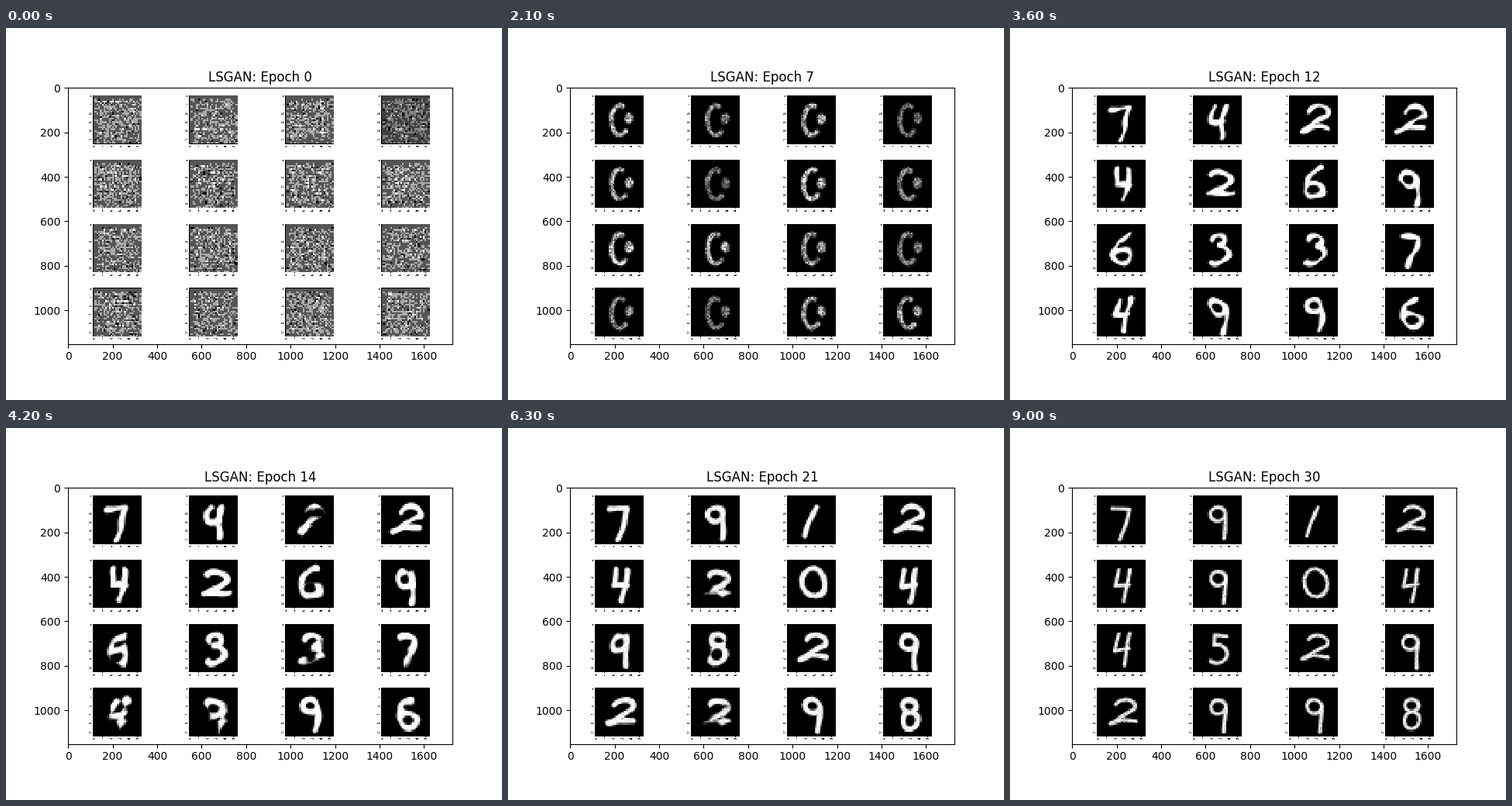
A matplotlib script for the animation above (9300 ms loop, 640 px wide and 480 px high).

```python
import numpy as np
import matplotlib.pyplot as plt
from matplotlib.animation import FuncAnimation
from matplotlib.textpath import TextPath

plt.rcParams["text.kerning_factor"] = 6

EPOCHS, STEP = 31, 300
N = 28                      # cells per side of a sample
SIDE = 62.4                 # sample side in stroke units
CELL_W, CELL_H = 432, 288   # size of one small plot
LEFT, TOP, SIZE = 112.68, 34.56, 217.44
SHIFT = 1.74                # half a screen pixel, in board units

mid = (np.arange(N) + 0.5) * SIDE / N
GX, GY = np.meshgrid(mid, mid)


def line(*xy):
    return np.array(xy, float).reshape(-1, 2)


def arc(cx, cy, rx, ry, start=0, stop=360):
    a = np.radians(np.linspace(start, stop, 14))
    return np.c_[cx + rx * np.cos(a), cy + ry * np.sin(a)]


def join(*parts):
    return np.vstack(parts)


GLYPHS = {
    "0": [arc(34, 30, 15, 18)],
    "1": [line(37, 16, 22, 52)],
    "2": [join(arc(36, 24, 13, 9, 205, 385), line(17, 45, 32, 41, 50, 43))],
    "3": [arc(33, 22, 9, 7, 200, 440), arc(31, 40, 13, 11, 285, 490)],
    "4": [line(28, 13, 23, 34, 41, 32), line(42, 13, 35, 53)],
    "5": [join(line(43, 16, 28, 15), arc(31, 39, 13, 12, 250, 490))],
    "6": [join(line(40, 12, 27, 22), arc(33, 40, 12, 9, 180, 530))],
    "7": [line(20, 17, 42, 18, 38, 34, 30, 57)],
    "8": [arc(34, 22, 9, 8), arc(34, 41, 10, 11)],
    "9": [join(arc(32, 24, 10, 9), line(42, 24, 40, 56))],
    # open ring with a blob that all samples share early on
    "e": [arc(32, 32, 11, 19, 50, 290), arc(44, 30, 2, 4)],
}

# What the 16 samples resemble at each key epoch
KEYS = [7, 12, 17, 30]
LOOKS = ["e" * 16, "7422426963374996", "7912420498292298", "7912490445292998"]
RADIUS = [2.9, 2.9, 2.9, 2.2]
GRAIN = [0.7, 0.1, 0.1, 0.25]
WOBBLE = [0.3, 2.0, 1.4, 0.5]
BLOBS = [0.2, 0.5, 0.2, 0.15]


def distance(lines, x, y):
    """Distance of every cell to the nearest stroke."""
    best = np.full((N, N), 11.0)
    for pts in lines:
        for (x0, y0), (x1, y1) in zip(pts, pts[1:]):
            dx, dy = x1 - x0, y1 - y0
            t = ((x - x0) * dx + (y - y0) * dy) / (dx * dx + dy * dy + 1e-9)
            t = np.clip(t, 0, 1)
            best = np.minimum(best, np.hypot(x - x0 - t * dx, y - y0 - t * dy))
    return best


def noise(rng, k):
    """Untrained output: two greys in faint stripes, few black or white cells."""
    p = rng.random((N, N))
    stripe = (np.arange(N) % 2)[:, None]
    p = np.clip(p + np.where(p > 0.04, 0.14 * stripe - 0.07, 0), 0, 1)
    edge = np.minimum(np.minimum(GX, SIDE - GX), np.minimum(GY, SIDE - GY))
    p = np.where((edge < 6) & (p > 0.15), p * 0.75, p)
    p[:2] = np.clip(p[:2], 0.02, 0.4)
    p[:, 0] = np.clip(p[:, 0], 0.02, 0.4)
    v = np.select([p < 0.015, p < 0.53, p < 0.955], [0, 85, 170], 255)
    return v * (0.76 if k == 3 else 1.0)


def spots(rng, k):
    """First traces of training: up to two small bright spots."""
    amps = np.random.default_rng(40 + k).random(2) ** 3
    v = np.zeros((N, N))
    for x, y, amp in ((35, 17, amps[0]), (27, 43, amps[1])):
        v += amp * np.clip(1.25 - np.hypot((GX - x) * 1.25, (GY - y) * 0.85) / 6, 0, 1)
    return 255 * np.clip(v, 0, 1) * rng.uniform(0.35, 1, (N, N))


def strokes(rng, k, epoch):
    j = int(np.clip(np.searchsorted(KEYS, epoch, side="right") - 1, 0, len(KEYS) - 2))
    w = np.clip((epoch - KEYS[j]) / (KEYS[j + 1] - KEYS[j]), 0, 1)

    def mix(a):
        return a[j] * (1 - w) + a[j + 1] * w

    own = np.random.default_rng(k)
    ph = own.uniform(0, 2 * np.pi, 4) + 0.08 * epoch
    glow = own.uniform(0.55, 1.1)
    x = GX + mix(WOBBLE) * np.sin(GY / 8 + ph[0])
    y = GY + mix(WOBBLE) * np.sin(GX / 8 + ph[1])
    d = mix([distance(GLYPHS[look[k]], x, y) for look in LOOKS[j:j + 2]]
            if j == 0 else
            [None] * j + [distance(GLYPHS[look[k]], x, y) for look in LOOKS[j:j + 2]])
    r = mix(RADIUS) * (1 + mix(BLOBS) * np.sin(GX / 5 + ph[2]) * np.sin(GY / 5 + ph[3]))
    v = np.clip((r + 3 * w * (1 - w) + 1.2 - d) / 2.2, 0, 1)
    v = v * (1.05 - mix(GRAIN) * rng.random((N, N)))
    return 255 * np.clip(v * mix([glow, 1, 1, 1]), 0, 1)


def sample(epoch, k):
    rng = np.random.default_rng(1000 * epoch + k)
    if epoch == 0:
        return noise(rng, k)
    if epoch < 4:
        v = spots(rng, k) * epoch / 3
        if epoch < 3:
            v = np.maximum(v, noise(rng, k) * 0.3 ** epoch)
    else:
        v = strokes(rng, k, epoch) * min(1, (epoch - 3) / 4)
        if epoch < 7:
            v = np.maximum(v, spots(rng, k) * (7 - epoch) / 4)
    if epoch < 5:
        v[0, ::2] = np.maximum(v[0, ::2], 45)
        v[::2, 0] = np.maximum(v[::2, 0], 35)
    return v


def stamp(img, text, x, base, align):
    """Rasterise a tick label with 4x4 oversampling."""
    path = TextPath((0, 0), text, size=10, prop={"family": "DejaVu Sans"})
    x0 = int(round(x - 6.36 * len(text) * align))
    s = (np.arange(64) + 0.5) / 4
    px, py = np.meshgrid(s, 12 - s)
    ink = path.contains_points(np.c_[px.ravel(), py.ravel()]).reshape(16, 4, 16, 4)
    ink = np.clip(1.5 * ink.mean(axis=(1, 3)), 0, 1)
    part = img[base - 12:base + 4, x0:x0 + 16]
    np.minimum(part, 255 * (1 - ink), out=part)


def blank_plot():
    img = np.full((CELL_H, CELL_W), 255.0)
    for t in range(0, 26, 5):
        off = (t + 0.5) * SIZE / N
        img[252:255, int(LEFT + off + 0.5)] = 0
        img[int(TOP + off), 110:113] = 0
        stamp(img, str(t), LEFT + off, 267, 0.5)
        stamp(img, str(t), 106, int(round(TOP + off + 3.6)), 1)
    return img


PLOT = blank_plot()
ROWS, COLS = np.arange(35, 252), np.arange(113, 330)
IY = np.clip(((ROWS + 0.5 - TOP) / SIZE * N).astype(int), 0, N - 1)
IX = np.clip(((COLS + 0.5 - LEFT) / SIZE * N).astype(int), 0, N - 1)


def board(epoch):
    img = np.tile(PLOT, (4, 4))
    for k in range(16):
        r, c = divmod(k, 4)
        plot = img[r * CELL_H:(r + 1) * CELL_H, c * CELL_W:(c + 1) * CELL_W]
        plot[35:252, 113:330] = sample(epoch, k)[np.ix_(IY, IX)]
        plot[34:252, [113, 330]] = 0
        plot[[34, 251], 113:331] = 0
    return img.astype(np.uint8)


fig, ax = plt.subplots(figsize=(6.4, 4.8), dpi=100)
height, width = 4 * CELL_H, 4 * CELL_W
view = ax.imshow(board(0), cmap="gray", vmin=0, vmax=255, interpolation="nearest",
                 extent=(-0.5, width - 0.5, height - 0.5 + SHIFT, SHIFT - 0.5))
ax.set(xlim=(-0.5, width - 0.5), ylim=(height - 0.5, -0.5))
title = ax.set_title("LSGAN: Epoch 0")


def update(epoch):
    view.set_data(board(epoch))
    title.set_text(f"LSGAN: Epoch {epoch}")
    return view, title


anim = FuncAnimation(fig, update, frames=EPOCHS, interval=STEP, repeat=True, repeat_delay=0)
plt.show()
```
